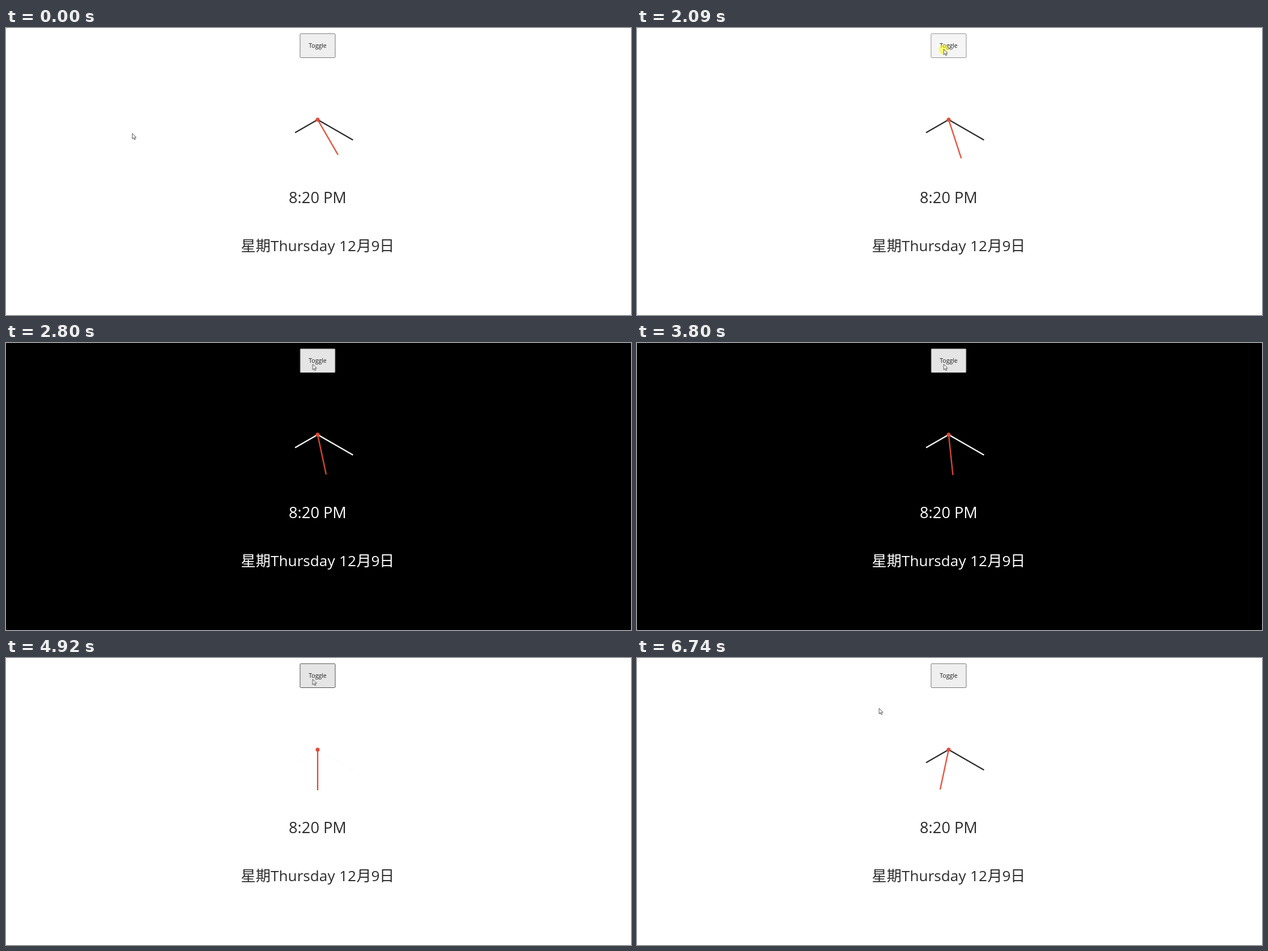
Animation, 1103 px wide and 508 px high, one loop 7.04 s. Source, as an HTML page:

```html
<!DOCTYPE html>
<html lang="en">
<head>
<meta charset="utf-8">
<title>Theme clock</title>
<style>
  html, body { margin: 0; width: 100%; height: 100%; overflow: hidden; }

  svg { display: block; width: 1103px; height: 508px; }
  svg * { animation-duration: 7040ms; animation-iteration-count: infinite; }

  text { font-family: "Open Sans", "Noto Sans", "Noto Sans CJK SC", "Noto Sans CJK", sans-serif; }

  .page { animation-name: page; animation-timing-function: step-end; }
  .info { fill: #2c2c2c; animation-name: ink; animation-timing-function: step-end; }
  .time { font-size: 27.2px; text-anchor: middle; }
  .date { font-size: 26.2px; }

  .button { stroke-width: 1; animation-name: button; animation-timing-function: step-end; }
  .label { font-size: 10.5px; text-anchor: middle; fill: #1c1c1c; }

  .hand { stroke-width: 2.3; fill: none; }
  .dark { stroke: #2c2c2c; animation-name: hands; animation-timing-function: ease-in; }
  .second { stroke: #de4c36; animation-name: tick; animation-timing-function: ease-in; }
  .dot { fill: #de4c36; }

  .cursor { animation-name: move; animation-timing-function: ease-in-out; }
  .click { fill: #ff0; opacity: 0; animation-name: click; animation-timing-function: step-end; }

  @keyframes page {
    0%, 69.886%, 100% { fill: #fff; }
    32.528% { fill: #000; }
  }
  @keyframes ink {
    0%, 69.886%, 100% { fill: #2c2c2c; }
    32.528% { fill: #fff; }
  }
  /* idle, hover, pressed */
  @keyframes button {
    0%, 73.153%, 100% { fill: #efefef; stroke: #767676; }
    19.886%, 32.528%, 69.886% { fill: #e5e5e5; stroke: #4f4f4f; }
    29.688%, 68.466% { fill: #f5f5f5; stroke: #8d8d8d; }
  }
  @keyframes click {
    0%, 32.528%, 69.886%, 100% { opacity: 0; }
    29.688%, 68.466% { opacity: .5; }
  }
  @keyframes hands {
    0%, 32.244% { stroke: #2c2c2c; }
    39.631%, 69.318% { stroke: #fff; }
    76.42%, 100% { stroke: #2c2c2c; }
  }
  @keyframes tick {
    0%, 3.835% { transform: rotate(150deg); }
    10.938%, 18.04% { transform: rotate(156deg); }
    25.142%, 32.528% { transform: rotate(162deg); }
    39.631%, 46.449% { transform: rotate(168deg); }
    53.551%, 60.653% { transform: rotate(174deg); }
    67.756%, 74.858% { transform: rotate(180deg); }
    81.96%, 88.636% { transform: rotate(186deg); }
    95.739%, 100% { transform: rotate(192deg); }
  }
  @keyframes move {
    0%, 3.3% { transform: translate(223px, 186.5px); }
    12.5%, 15.341% { transform: translate(422.5px, 84px); }
    21.307%, 71.733% { transform: translate(541.3px, 37.5px); }
    81.25% { transform: translate(466.5px, 72px); }
    88.068% { transform: translate(418.5px, 77px); }
    92.614%, 100% { transform: translate(427.3px, 89px); }
  }
</style>
</head>
<body>
<svg viewBox="0 0 1103 508">
  <rect class="page" width="1103" height="508" fill="#fff"/>

  <rect class="button" x="519" y="10" width="62" height="42.5" rx="1.5"/>
  <text class="label" x="550" y="35.3">Toggle</text>

  <g transform="translate(550 162.2)">
    <path class="hand dark" d="M0 0V-46" transform="rotate(240)"/>
    <path class="hand dark" d="M0 0V-72" transform="rotate(120)"/>
    <path class="hand second" d="M0 0V-72"/>
    <circle class="dot" r="3.6"/>
  </g>

  <text class="info time" x="550" y="310.3">8:20 PM</text>
  <text class="info date" y="395"><tspan x="414.5">星期</tspan><tspan x="467">Thursday</tspan><tspan x="588">12</tspan><tspan x="618.5">月</tspan><tspan x="644.5">9</tspan><tspan x="659">日</tspan></text>

  <circle class="click" cx="541" cy="38" r="8.7"/>
  <path class="cursor" d="M0 0V9.8L2.2 7.8L3.7 11.2L5.3 10.5L3.9 7.2H6.8Z" fill="#fff" stroke="#222" stroke-width=".8"/>
</svg>
</body>
</html>
```
